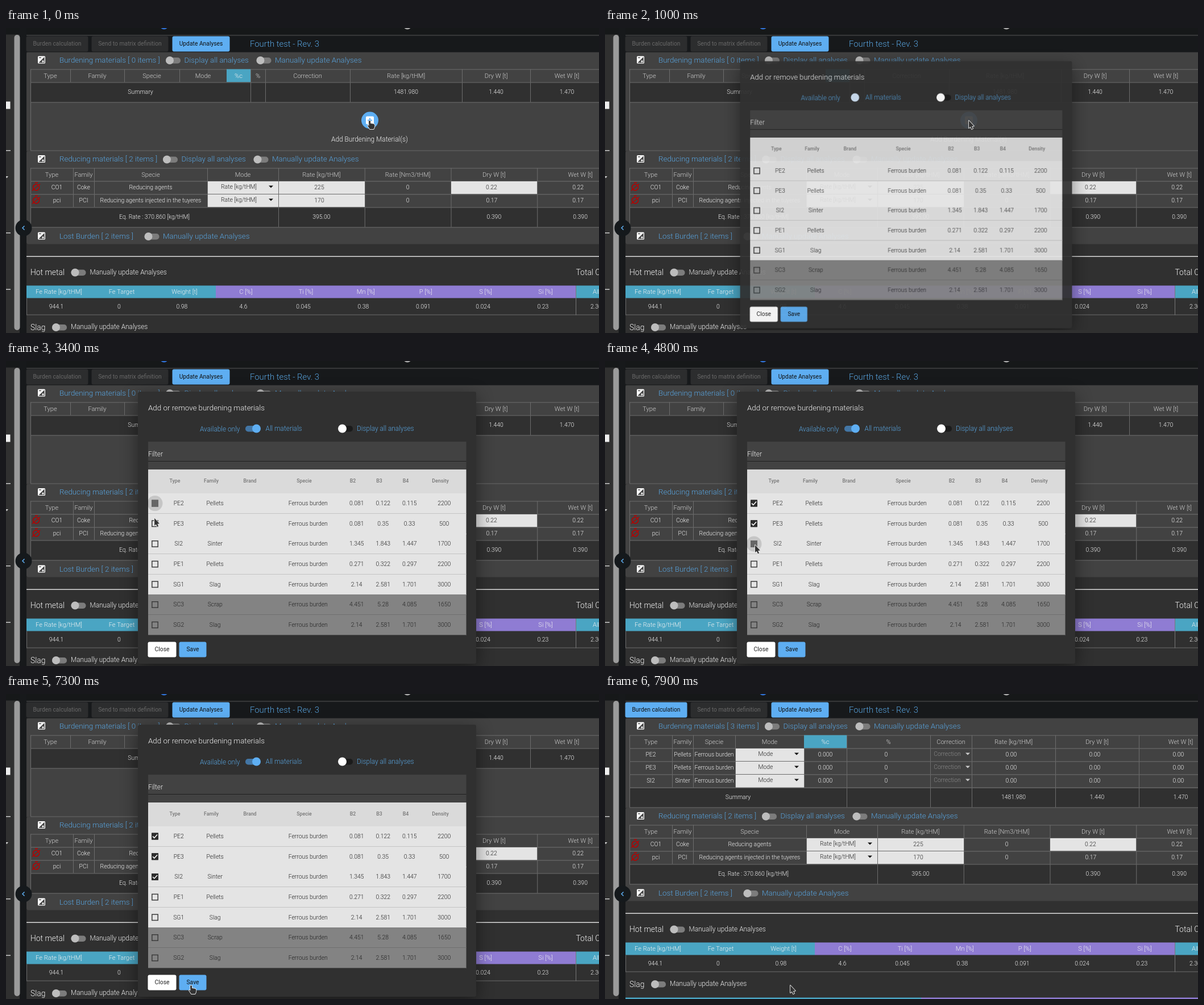
Recreate the animation shown at these times as an HTML page with a canvas. Size 1043 by 537 pixels, loop 8 s.

```html
<!DOCTYPE html>
<html lang="en">
<head>
<meta charset="utf-8">
<title>Burden materials</title>
<style>
  html, body { margin: 0; width: 100%; height: 100%; overflow: hidden; background: #303030; }
  canvas { display: block; }
</style>
</head>
<body>
<canvas id="stage" width="1043" height="537"></canvas>
<script>
const W = 1043, H = 537, LOOP = 8000, STEP = 100;
const OPEN = 700, CLICK = 3400, CLICK_GAP = 700, CLOSE = 7600, RESULT = 7800;
const BLUE = '#5eaef2', LINK = '#58a4df', TEAL = '#4aa5c3', PURPLE = '#8f7cd3';
const PANEL = '#424242', DARK = '#303030', LINE = '#6c6c6c', LIGHT = '#e4e4e4', HEAD = '#cfcfcf', INK = '#222';
const CELL = 10.4, HEADER = 11.1, TITLE = 13.35, LABEL = 11.85, SECTION = 13.9;

const screen = document.getElementById('stage').getContext('2d');
const layer = Object.assign(document.createElement('canvas'), { width: W, height: H });
const dialogCtx = layer.getContext('2d');
let c = screen;

function text(s, x, y, size = CELL, color = '#f2f2f2', align = 'center', weight = 300) {
  c.font = `${weight} ${size}px Roboto, sans-serif`;
  c.textAlign = align;
  c.textBaseline = 'middle';
  c.fillStyle = color;
  c.fillText(s, x, y + 0.3);
}
const left = (s, x, y, size, color) => text(s, x, y, size, color, 'left');

function rect(x, y, w, h, color, r = 0) {
  c.fillStyle = color;
  c.beginPath();
  c.roundRect(x, y, w, h, r);
  c.fill();
}
function disc(x, y, r, color) {
  c.fillStyle = color;
  c.beginPath();
  c.arc(x, y, r, 0, 7);
  c.fill();
}
function path(points, fill, stroke, width = 1, closed = true) {
  c.beginPath();
  points.forEach(([x, y]) => c.lineTo(x, y));
  if (closed) c.closePath();
  c.lineWidth = width;
  if (stroke) { c.strokeStyle = stroke; c.stroke(); }
  if (fill) { c.fillStyle = fill; c.fill(); }
}
const arrowDown = (x, y, color) => path([[x - 4, y - 2], [x + 4, y - 2], [x, y + 2]], color);

function button(s, x, y, w, bg, color) {
  rect(x - 0.5, y, w + 1, 27, bg, 3);
  text(s, x + w / 2, y + 13.5, 10.3, color, 'center', 400);
}

function toggle(x, y, thumbX = x + 7, track = '#7c7c7c', thumb = '#bdbdbd', r = 7) {
  if (track) rect(x, y - 5, 26, 10.5, track, 5);
  disc(thumbX, y, r, thumb);
}

// White tile, lower right half cut out, with a minus and a plus.
function exposureIcon(x, y) {
  rect(x - 6.5, y - 6.5, 13, 13, '#fff', 1.5);
  path([[x + 5.2, y - 5.2], [x + 5.2, y + 5.2], [x - 5.2, y + 5.2]], PANEL);
  rect(x - 4.5, y - 4.3, 4, 1.3, PANEL);
  rect(x + 0.5, y + 2, 4, 1.3, '#fff');
  rect(x + 1.9, y + 0.7, 1.3, 4, '#fff');
}

function timerOffIcon(x, y) {
  c.strokeStyle = '#b80000';
  c.lineWidth = 1.5;
  c.beginPath();
  c.arc(x, y + 1, 5.5, 0, 7);
  c.stroke();
  path([[x - 7, y + 7], [x + 7, y - 5]], null, '#b80000', 1.5, false);
  rect(x - 2, y - 8, 5, 1.5, '#b80000');
}

// Given column edges, followed by equal columns that run past the stage.
function columns(edges, step) {
  const all = [...edges];
  while (all.at(-1) < W) all.push(all.at(-1) + step);
  return all;
}

function row(y, h, edges, labels, { bg = PANEL, size = CELL, color, shift = () => 0 } = {}) {
  rect(edges[0], y, W, h, bg);
  rect(edges[0], y, W, 1, LINE);
  rect(edges[0], y + h, W, 1, LINE);
  labels.forEach((s, i) => {
    rect(edges[i], y, 1, h, LINE);
    text(s, (edges[i] + edges[i + 1]) / 2 + shift(i), y + h / 2, size, color);
  });
}
const headerRow = (y, edges, labels) => row(y, 23, edges, labels, { size: HEADER, color: HEAD });
const summaryRow = (y, edges, from, labels) =>
  row(y, 35, [edges[0], ...edges.slice(from)], labels, { bg: DARK });

function field(x, y, w, s, dropdown) {
  rect(x + 1, y + 0.5, w - 1, 22.5, LIGHT);
  text(s, x + w / 2 - (dropdown ? 7 : 4), y + (dropdown ? 10 : 11.5), CELL, INK);
  if (dropdown) arrowDown(x + w - 13, y + 10, '#111');
}

function panelTitle(s, y, toggles) {
  exposureIcon(62.5, y - 0.5);
  left(s, 94, y, TITLE, LINK);
  toggles.forEach(([x, label]) => {
    toggle(x, y + 0.5);
    left(label, x + 32.5, y, TITLE, LINK);
  });
}

const UPDATE = 'Manually update Analyses', SHOW = 'Display all analyses';
const BURDEN_HEAD = ['Type', 'Family', 'Specie', 'Mode', '', '%', 'Correction', 'Rate [kg/tHM]', 'Dry W [t]', 'Wet W [t]'];
const BURDEN_SUM = ['Summary', '', '', '1481.980', '1.440', '1.470'];

function burdenPanel(count, h, edges, summaryY) {
  rect(36, 43, W, h, PANEL, [4, 0, 0, 0]);
  panelTitle(`Burdening materials [ ${count} items ]`, 57, [[281, SHOW], [440.5, UPDATE]]);
  headerRow(73, edges, BURDEN_HEAD);
  rect(edges[4], 73, edges[5] - edges[4], 23, TEAL);
  text('%c', (edges[4] + edges[5]) / 2, 84.5, HEADER, '#eee');
  summaryRow(summaryY, edges, 5, BURDEN_SUM);
}

function emptyBurden() {
  burdenPanel(0, 174, [43, 113, 208, 305, 388, 430, 456, 605, 802, 922, 1051], 96);
  rect(43, 131, 1, 85, LINE);
  rect(43, 216, W, 1, LINE);
  disc(640, 163, 15, BLUE);
  rect(633, 156, 14, 14, '#fff', 2);
  rect(636, 162, 8, 2, BLUE);
  rect(639, 159, 2, 8, BLUE);
  text('Add Burdening Material(s)', 639.5, 196.5, LABEL);
}

function filledBurden() {
  const edges = columns([43, 118, 155, 229, 350, 425, 572, 645], 147);
  burdenPanel(3, 158, edges, 165);
  materials.slice(0, 3).forEach(([type, family], i) => {
    const y = 96 + 23 * i;
    row(y, 23, edges, [type, family, SPECIE, '', '0.000', '0', '', '0.00', '0.00', '0.00'],
      { shift: col => col > 4 ? -4 : 0 });
    field(229, y, 121, 'Mode', true);
    text('Correction', 602, y + 10, CELL, '#8c8c8c');
    arrowDown(638, y + 10, '#ccc');
  });
}

const METALS = ['C', 'Ti', 'Mn', 'P', 'S', 'Si'].map(s => s + ' [%]');
const METAL_VALUES = '944.1 0 0.98 4.6 0.045 0.38 0.091 0.024 0.23'.split(' ');

function metalBar(y, split, end) {
  rect(36, y, split - 36, 22, TEAL);
  rect(split, y, end - split, 22, PURPLE);
}

function lowerPage() {
  rect(36, 217, W, 164, PANEL, [4, 0, 0, 4]);
  panelTitle('Reducing materials [ 2 items ]', 231.5, [[276, SHOW], [435.5, UPDATE]]);
  const edges = columns([43, 118, 155, 354, 479], 151.75);
  headerRow(247, edges,
    ['Type', 'Family', 'Specie', 'Mode', 'Rate [kg/tHM]', 'Rate [Nm3/tHM]', 'Dry W [t]', 'Wet W [t]']);
  [['CO1', 'Coke', 'Reducing agents', '225', '0.22'],
   ['pci', 'PCI', 'Reducing agents injected in the tuyeres', '170', '0.17']
  ].forEach(([type, family, specie, rate, weight], i) => {
    const y = 270 + 23 * i;
    row(y, 23, edges, [type, family, specie, '', '', '0', weight, weight],
      { shift: col => col ? (col > 5 ? -4 : 0) : 9 });
    field(354, y, 125, 'Rate [kg/tHM]', true);
    field(479, y, 152, rate);
    if (!i) field(782, y, 152, weight);
    timerOffIcon(53, y + 10);
  });
  summaryRow(316, edges, 4, ['Eq. Rate : 370.860 [kg/tHM]', '395.00', '', '0.390', '0.390']);
  panelTitle('Lost Burden [ 2 items ]', 367, [[243.5, UPDATE]]);

  rect(36, 402, W, 1.5, '#dcdcdc');
  left('Hot metal', 43, 431.5, SECTION);
  toggle(114.5, 431);
  left(UPDATE, 147.5, 430.5, LABEL);
  left('Total Cost', 1002.5, 431.5, SECTION);
  metalBar(454, 369, 1002);
  metalBar(551, 556, W);
  rect(1003, 454, 40, 22, TEAL);
  ['Fe Rate [kg/tHM]', 'Fe Target', 'Weight [t]', ...METALS].forEach((name, i) => {
    const x = i < 3 ? 93 + 110.5 * i : 422 + 105.4 * (i - 3);
    text(name, x, 465, HEADER);
    text(METAL_VALUES[i], x - 4.5, 491);
  });
  left('All', 1032, 465, HEADER);
  left('2.30', 1028, 491);
  rect(36, 505, W, 1, LINE);
  rect(36, 476, 1, 30, LINE);
  rect(1002, 454, 1, 52, '#777');
  left('Slag', 43, 528, SECTION);
  toggle(81, 527.5);
  left(UPDATE, 114, 527, LABEL);
}

function chrome(filled) {
  rect(0, 0, W, 12, '#161819');
  rect(24, 0, 12, H + 1, '#17191b');
  rect(36, 12, W, 31, '#17191b');
  rect(36, 13, W, 1, '#555');
  disc(278, -4, 7, '#2f6fd0');
  disc(706, -4, 7, '#a8a8a8');
  rect(14.5, 12.5, 10, 520, '#9b9b9b', 5);
  rect(0, 130, 7.5, 13, '#eee');
  [215.5, 360.5, 460].forEach(y => rect(0, y, 8, 1.5, '#ccc'));
  path([[0, 261.5], [4, 261.5], [1, 265]], '#ddd');
  disc(31, 352.5, 14.5, '#15191c');
  path([[32.5, 349], [29, 352.5], [32.5, 356]], null, BLUE, 1.5, false);
  button('Burden calculation', 36, 15, 108, filled ? BLUE : '#2c2d2e', filled ? '#111' : '#686868');
  button('Send to matrix definition', 151, 15, 134, '#2c2d2e', '#686868');
  button('Update Analyses', 293, 15, 100, BLUE, '#111');
  left('Fourth test - Rev. 3', 429, 28.5, 14.9, LINK);
}

function page(filled) {
  rect(0, 0, W, H, DARK);
  c.save();
  c.translate(0, filled ? -16.5 : -0.5);
  lowerPage();
  if (filled) c.translate(0, 16);
  (filled ? filledBurden : emptyBurden)();
  chrome(filled);
  c.restore();
}

const SPECIE = 'Ferrous burden';
const materials = `PE2 Pellets 0.081 0.122 0.115 2200
PE3 Pellets 0.081 0.35 0.33 500
SI2 Sinter 1.345 1.843 1.447 1700
PE1 Pellets 0.271 0.322 0.297 2200
SG1 Slag 2.14 2.581 1.701 3000
SC3 Scrap 4.451 5.28 4.085 1650
SG2 Slag 2.14 2.581 1.701 3000`.split('\n').map(line => line.split(' '));
const DIALOG_HEAD = ['Type', 'Family', 'Brand', 'Specie', 'B2', 'B3', 'B4', 'Density'];
const DIALOG_X = [297, 361, 429, 524.5, 610, 656.5, 703, 764];

function checkbox(x, y, age) {
  if (age >= 0 && age < 300) disc(x, y, 13.5, 'rgba(0,0,0,.13)');
  c.strokeStyle = '#3c3c3c';
  c.lineWidth = 1.5;
  c.strokeRect(x - 5.2, y - 5.2, 10.4, 10.4);
  if (age < 0) return;
  rect(x - 6, y - 6, 12, 12, age ? '#2c2c2c' : '#666', 1);
  if (age) path([[x - 4, y], [x - 1.2, y + 2.8], [x + 4.2, y - 3]], null, '#fff', 1.5, false);
}

function dialog(t, settled) {
  c.clearRect(0, 0, W, H);
  c.save();
  c.shadowColor = 'rgba(0,0,0,.45)';
  c.shadowBlur = 30;
  c.shadowOffsetY = 8;
  rect(232, 54, 595, 479, DARK, 3);
  c.restore();
  left('Add or remove burdening materials', 250, 83, TITLE);
  left('Available only', 341, 120, LABEL, LINK);
  toggle(421, 119, settled ? 440.5 : 438, settled && '#4376a5', settled ? BLUE : '#cfe2f5', 7.5);
  left('All materials', 456.5, 119, LABEL, LINK);
  toggle(584, 119, 591.5, '#1b1b1b', '#fff', 7.5);
  left(SHOW, 617, 119, LABEL, LINK);

  rect(250, 142, 559.5, 49, PANEL);
  left('Filter', 250, 164, LABEL);
  rect(250, 176, 559.5, 1, '#1f1f1f');
  rect(250, 191, 559.5, 42, '#dadada');
  DIALOG_HEAD.forEach((s, i) => text(s, DIALOG_X[i], 211, 8.8, '#777', 'center', 500));
  materials.forEach(([type, family, ...numbers], i) => {
    const y = 233 + 35.67 * i, mid = y + 17.6;
    rect(250, Math.round(y), 559.5, 36, i < 5 ? LIGHT : '#838383');
    rect(250, Math.round(y + 35), 559.5, 1, i < 5 ? '#c4c4c4' : '#707070');
    checkbox(262, mid, i < 3 ? t - CLICK - CLICK_GAP * i : -1);
    [type, family, '', SPECIE, ...numbers].forEach((s, k) => text(s, DIALOG_X[k] + 6.7, mid, CELL, INK));
  });
  rect(250, 482.5, 559.5, 11, DARK);
  button('Close', 250, 494.5, 49, '#fff', INK);
  button('Save', 305, 494.5, 47, BLUE, '#111');
}

function showDialog(t) {
  const p = Math.min(1, (t - OPEN) / 400);
  if (p <= 0 || t >= CLOSE + STEP) return;
  const eased = 1 - (1 - p) ** 2, scale = 0.7 + 0.3 * eased;
  c = dialogCtx;
  dialog(t, p === 1);
  c = screen;
  c.save();
  c.globalAlpha = t < CLOSE ? eased : 0.5;
  c.translate(529.5, 293.5);
  c.scale(scale, scale);
  c.drawImage(layer, -529.5, -293.5);
  c.restore();
}

// Pointer moves: start time, end time, destination.
const moves = [
  [1400, 1900, 103, 392], [1900, 2200, 334, 257], [2200, 2800, 269, 247], [3300, 3500, 260, 281],
  [4000, 4100, 264, 298], [4400, 4500, 264, 324], [5200, 5500, 254, 289], [5500, 5800, 309, 240],
  [5900, 6100, 309, 276], [6200, 6600, 327, 467], [6600, 6700, 324, 560], [6900, 7300, 326, 513]
];

function cursor(t) {
  let x = 640, y = 163;
  for (const [start, end, toX, toY] of moves) {
    const p = Math.max(0, Math.min(1, (t - start) / (end - start))), eased = 1 - (1 - p) ** 3;
    x += (toX - x) * eased;
    y += (toY - y) * eased;
  }
  c.save();
  c.translate(x, y);
  c.lineJoin = 'round';
  const hand = t <= OPEN || (t >= 7200 && t < CLOSE);
  const shape = hand
    ? [[-2, 1], [0, 0], [1, 1], [1, 5], [7, 6], [8.5, 8], [8, 12], [6.5, 15], [0, 15], [-4, 9], [-3, 8], [-1.5, 9.5]]
    : [[0, 0], [0, 13], [2.8, 10.8], [5, 15.2], [7, 14.2], [5, 10], [8.8, 9.5]];
  path(shape, '#333', '#e8e8e8', 1.8);
  c.restore();
}

function tick() {
  const t = Math.floor(performance.now() % LOOP / STEP) * STEP;
  page(t >= RESULT);
  showDialog(t);
  cursor(t);
  requestAnimationFrame(tick);
}
tick();
</script>
</body>
</html>
```
